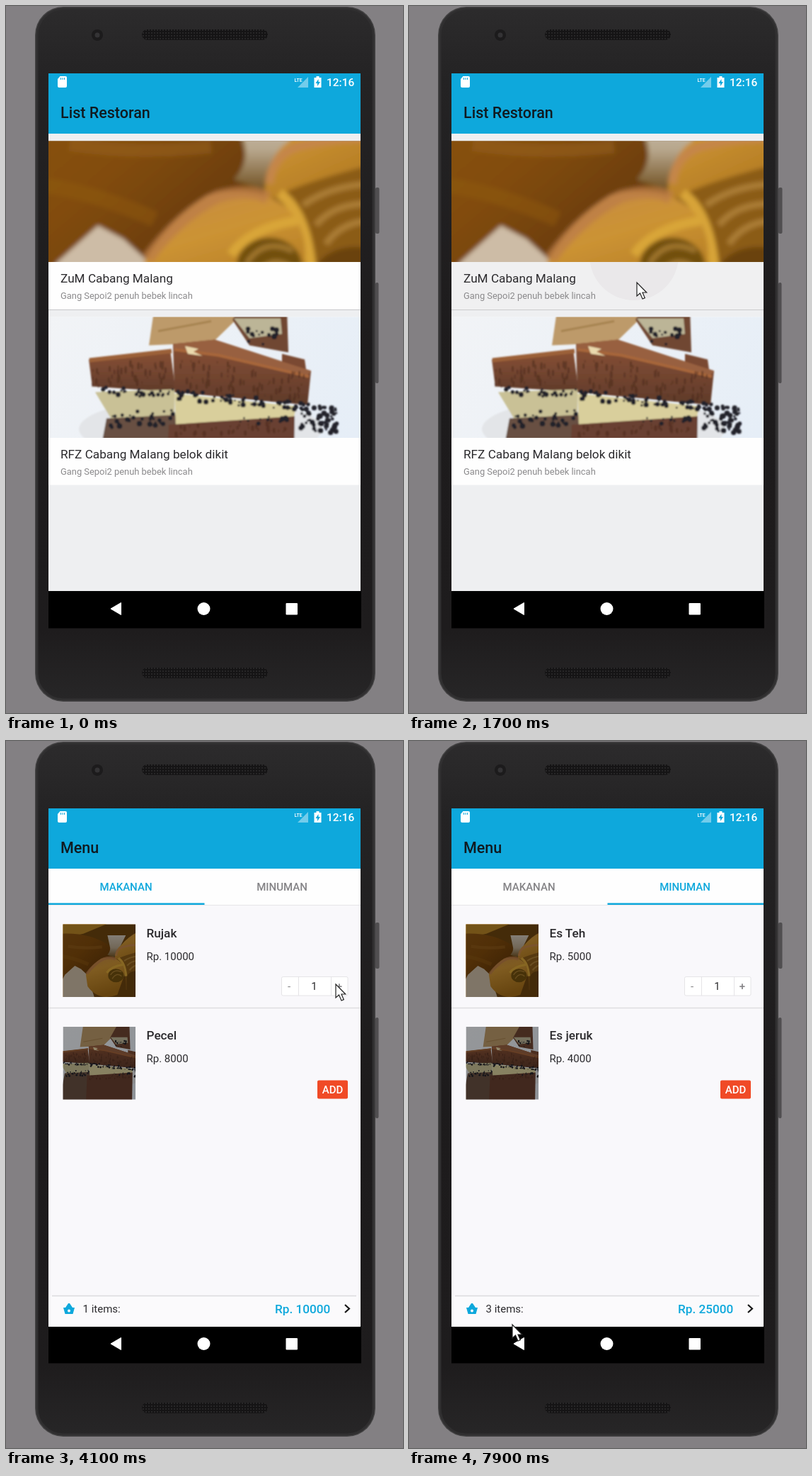
An HTML page that plays this animation: 561 px wide and 997 px high, repeating every 8 s.

```html
<!DOCTYPE html>
<html lang="id">
<head>
<meta charset="utf-8">
<title>List Restoran</title>
<style>
html, body { margin: 0; width: 100%; height: 100%; overflow: hidden; background: #838083; }
#stage { display: block; width: 100%; height: 100%; }
text { font-family: Roboto, "Noto Sans", sans-serif; fill: #2b2a2d; }
.title { font-size: 21.5px; font-weight: 500; fill: #101a20; }
.name { font-size: 17.2px; }
.small { font-size: 12.9px; fill: #8b8a8c; }
.body { font-size: 15px; }
.bold { font-weight: 500; }
.mid { text-anchor: middle; }
.white { fill: #fff; }
.grey { fill: #858487; }
.blue { fill: #0ea8dc; }
</style>
</head>
<body>
<svg id="stage" viewBox="0 0 561 997" preserveAspectRatio="none">
<defs>
  <linearGradient id="case" x2="0" y2="1">
    <stop stop-color="#2c2b2c"/><stop offset=".1" stop-color="#242324"/>
    <stop offset=".5" stop-color="#1d1b1c"/><stop offset=".9" stop-color="#1e1c1d"/><stop offset="1" stop-color="#272627"/>
  </linearGradient>
  <linearGradient id="crust" x2=".8" y2="1">
    <stop stop-color="#8a5413"/><stop offset=".4" stop-color="#824c0c"/><stop offset="1" stop-color="#5a3206"/>
  </linearGradient>
  <linearGradient id="dish" x2="0" y2="1">
    <stop stop-color="#d3cabd"/><stop offset=".55" stop-color="#b7a68c"/><stop offset="1" stop-color="#6e4d1c"/>
  </linearGradient>
  <linearGradient id="gold" x2=".3" y2="1">
    <stop stop-color="#c58a45"/><stop offset=".35" stop-color="#cc9334"/><stop offset="1" stop-color="#a46d18"/>
  </linearGradient>
  <linearGradient id="sky" x2="1" y2=".4">
    <stop stop-color="#f3f4f6"/><stop offset="1" stop-color="#e6eef7"/>
  </linearGradient>
  <linearGradient id="cake" x2="0" y2="1">
    <stop stop-color="#8a5233"/><stop offset=".4" stop-color="#794831"/><stop offset="1" stop-color="#5f3b2b"/>
  </linearGradient>
  <filter id="soft"><feGaussianBlur stdDeviation="3"/></filter>
  <filter id="crisp"><feGaussianBlur stdDeviation="1"/></filter>
  <pattern id="mesh" width="4" height="4" patternUnits="userSpaceOnUse">
    <rect width="4" height="4" fill="#151415"/><circle cx="2" cy="2" r="1" fill="#2c2b2c"/>
  </pattern>
  <g id="rolls">
    <rect x="-30" y="-140" width="520" height="460" fill="#6e450f"/>
    <g filter="url(#soft)">
      <path d="M-20-140H290L120-70-20-40Z" fill="#b98526"/>
      <path d="M-20-70Q160-80 272 0 285 30 262 55 300 70 230 100L160 240H-20Z" fill="url(#crust)"/>
      <path d="M30 5Q130 20 230 8" fill="none" stroke="#9a6420" stroke-width="18" opacity=".5"/>
      <path d="M-20 60Q60 70 150 110" fill="none" stroke="#8f5a15" stroke-width="22" opacity=".5"/>
      <path d="M262-60H370L330 20 312 72 262 54Q285 30 275 0Z" fill="url(#dish)"/>
      <path d="M-20 320V230L12 171 70 119 106 138 142 171 190 320Z" fill="#cdbca6"/>
      <path d="M305 78Q308 20 340 0 400-70 470-90V160Q400 100 330 82Z" fill="url(#gold)"/>
      <path d="M312 60Q316 20 352 8 400-5 460-4" fill="none" stroke="#c58648" stroke-width="12"/>
      <path d="M330 74Q370 55 470 30V260H372Q368 110 330 74Z" fill="#8b5c18"/>
      <path d="M360 90Q400 62 460 60M378 118Q405 86 460 88M392 145Q415 112 460 112" fill="none" stroke="#b98c40" stroke-width="9" opacity=".7"/>
      <path d="M375 180Q400 140 460 152V260H375Z" fill="#6b430e"/>
      <path d="M326 74Q364 100 371 180" fill="none" stroke="#d8a438" stroke-width="15"/>
      <path d="M135 171Q170 110 225 76 285 62 325 85 368 115 362 171L320 290Q210 330 145 240Z" fill="url(#gold)"/>
      <path d="M140 166Q185 105 240 78 285 66 310 80" fill="none" stroke="#bd7d49" stroke-width="17" opacity=".75"/>
      <path d="M258 160Q285 122 352 112" fill="none" stroke="#d9a637" stroke-width="13"/>
      <ellipse cx="312" cy="176" rx="46" ry="40" fill="#72500f"/>
      <path d="M280 172Q305 135 345 155M290 195Q315 155 345 180" fill="none" stroke="#b4873a" stroke-width="6" opacity=".8"/>
    </g>
  </g>
  <g id="cakes">
    <rect x="-30" y="-60" width="520" height="330" fill="url(#sky)"/>
    <g filter="url(#crisp)">
      <ellipse cx="215" cy="158" rx="172" ry="44" fill="#e3e5e8"/>
      <path d="M142 40L155-50H290L265 4 232 36Z" fill="#bd9a6b"/>
      <path d="M155 20L230 6" stroke="#a6834f" stroke-width="3"/>
      <path d="M260 4L285-40H336L339 50 284 40Z" fill="#6f4632"/>
      <path d="M262 2H328L330 24 284 30Z" fill="#bcb597"/>
      <path d="M330 52L362 60 364 74 330 66Z" fill="#7a4a32"/>
      <path d="M57 60L172 46 180 106 62 98Z" fill="url(#cake)"/>
      <path d="M58 61L174 48" stroke="#9b6038" stroke-width="6"/>
      <path d="M66 106L178 102V140L90 146Z" fill="#c9c196"/>
      <path d="M82 143L182 138V260H60Z" fill="#685042"/>
      <path d="M176 38L235 32 371 76 366 124 300 118 178 106Z" fill="url(#cake)"/>
      <path d="M176 38L235 32 371 76 365 84 240 54 178 46Z" fill="#986040"/>
      <path d="M178 46L240 54 368 84" fill="none" stroke="#a7663a" stroke-width="4"/>
      <path d="M178 108L350 126 346 146 180 154Z" fill="#d9cf9c"/>
      <path d="M170 152L348 140 346 260H165Z" fill="#694030"/>
      <path d="M193 41L212 45 205 49 218 55 197 52Z" fill="#ead9ad"/>
      <g id="pores" fill="#4b2a1d" opacity=".55"></g>
      <g id="crumbs" fill="#22222a"></g>
    </g>
  </g>
</defs>

<rect width="561" height="997" fill="#838083"/>
<rect x="522" y="256" width="5.500" height="65" rx="2" fill="#504e50"/>
<rect x="522" y="390" width="4.500" height="142" rx="2" fill="#504e50"/>
<rect x="41" y="1" width="481" height="980" rx="40" fill="#434243"/>
<rect x="44" y="4" width="475" height="974" rx="37" fill="url(#case)" stroke="#302f30" stroke-width="3"/>
<rect x="192" y="33" width="178" height="15" rx="7.5" fill="url(#mesh)"/>
<rect x="192" y="933" width="178" height="15" rx="7.5" fill="url(#mesh)"/>
<circle cx="129" cy="41" r="8" fill="#1c1b1c"/><circle cx="129" cy="41" r="3.5" fill="#343335"/>

<rect x="60" y="825" width="442" height="52.5"/>
<svg x="60" y="95" width="441" height="731" viewBox="60 95 441 731">
  <rect x="60" y="95" width="441" height="730" fill="#eeeff1"/>
  <g id="cards"></g>
  <rect x="60" y="95" width="441" height="85" fill="#0ea8dc"/>
  <text class="title" x="77" y="158">List Restoran</text>

  <g id="menu">
    <rect x="60" y="95" width="441" height="731" fill="#f9f8fb"/>
    <rect x="60" y="95" width="441" height="85" fill="#0ea8dc"/>
    <text class="title" x="77" y="158">Menu</text>
    <rect x="60" y="180" width="441" height="51" fill="#fefefe"/>
    <path d="M60 231.5H501" stroke="#e6e5e8"/>
    <text class="body bold mid" x="169.5" y="211" id="tab0">MAKANAN</text>
    <text class="body bold mid" x="390" y="211" id="tab1">MINUMAN</text>
    <rect id="line" x="60" y="228.5" width="220.5" height="2.5" fill="#0ea8dc"/>
    <g id="pages"></g>
    <g id="cart">
      <rect x="60" y="782" width="441" height="44" fill="#fbfafc"/>
      <path d="M65 782.5H495" stroke="#dbdadd" stroke-width="1.5"/>
      <path d="M81 799H97L94.5 808H83.5ZM84 799L88 793H90L94 799" fill="#0ea8dc"/>
      <circle cx="89" cy="803.5" r="2" fill="#fbfafc"/>
      <text class="body" x="108.5" y="806" id="count"></text>
      <text class="name bold blue" x="380" y="807" id="total"></text>
      <path d="M479 795L485 800.5 479 806" fill="none" stroke="#161616" stroke-width="2.2"/>
    </g>
  </g>
</svg>

<path d="M76.500 99H84Q86 99 86 101V113Q86 115 84 115H75Q73 115 73 113V103Z" fill="#fff"/>
<path d="M77.500 101V104M80 101V104M82.500 101V104" stroke="#0ea8dc"/>
<path d="M427 100V115H412Z" fill="#fff" opacity=".42"/>
<text class="white bold" x="407.500" y="106.500" font-size="7">LTE</text>
<path d="M438.500 99H442.500V101H445.500V115H435.500V101H438.500Z" fill="#fff"/>
<path d="M441.500 103L437.500 109H440V113L444 107H441.500Z" fill="#0ea8dc"/>
<text class="white bold" x="453" y="113" font-size="15.500">12:16</text>
<g fill="#fff">
  <path d="M148 850L162.500 841.500V858.500Z" stroke="#fff" stroke-linejoin="round"/>
  <circle cx="279.500" cy="850" r="9"/>
  <rect x="395.500" y="842" width="16.500" height="16.500" rx="1"/>
</g>
<path id="cursor" d="M0 0V19L4.500 15 8 23 11.300 21.600 8 14H13.800Z" fill="#fff" stroke="#222" stroke-width="1.200"/>
</svg>

<script>
const $ = id => document.getElementById(id);
const set = (id, attrs) => { for (const k in attrs) $(id).setAttribute(k, attrs[k]); };
const show = (id, on) => set(id, { display: on ? 'inline' : 'none' });

// Seeded specks inside a box that may lean by `slope`
let seed = 7;
const rand = () => (seed = seed * 16807 % 2147483647) / 2147483647;
const scatter = (n, x, y, w, h, slope, size = 2.6, tall = 1) => Array.from({ length: n }, () => {
  const u = rand(), v = rand(), r = size * (.5 + rand());
  return `<ellipse cx="${x + u * w}" cy="${y + v * h + u * slope}" rx="${r}" ry="${r * tall}"/>`;
}).join('');
$('pores').innerHTML = scatter(45, 62, 68, 110, 30, -5, 1.3, 3) + scatter(75, 182, 56, 180, 42, 25, 1.3, 3) +
  scatter(40, 180, 154, 160, 14, -6, 1.5, 2);
$('crumbs').innerHTML = scatter(30, 64, 98, 112, 12, 4) + scatter(30, 86, 134, 92, 22, -4) +
  scatter(60, 182, 102, 170, 14, 18) + scatter(14, 270, 142, 78, 10, -4) +
  scatter(75, 356, 120, 52, 38, 8) + scatter(16, 275, 10, 55, 26, 5);

const card = (y, art, name) => `
  <rect x="60" y="${y}" width="441" height="237" fill="#fefefe"/>
  ${y < 200 ? `<path d="M60 428.500H501" stroke="#cbcbcd"/>
    <g id="press"><rect x="60" y="361" width="441" height="67" fill="#f0f0f1"/>
    <svg x="60" y="361" width="441" height="67" viewBox="60 361 441 67">
    <circle id="ripple" fill="#eae8ea"/></svg></g>` : ''}
  <svg x="60" y="${y}" width="441" height="170.5"><use href="#${art}"/></svg>
  <text class="name" x="77" y="${y + 199.5}">${name}</text>
  <text class="small" x="77" y="${y + 222.5}">Gang Sepoi2 penuh bebek lincah</text>`;
$('cards').innerHTML = card(190.5, 'rolls', 'ZuM Cabang Malang') +
  card(438.5, 'cakes', 'RFZ Cabang Malang belok dikit');

const crop = { rolls: 'translate(0 30) scale(.24)', cakes: 'translate(-27 14) scale(.36)' };
const item = (id, x, y, art, name, price) => `<g transform="translate(${x} ${y})">
  <svg x="80.5" y="258.500" width="102.500" height="102.500">
    <use href="#${art}" transform="${crop[art]}"/><rect width="103" height="103" opacity=".38"/></svg>
  <text class="name bold" x="198.500" y="276.500">${name}</text>
  <text class="body" x="198.500" y="308.500">Rp. ${price}</text>
  <path d="M60 376.500H501" stroke="#dedde0" stroke-width="1.300" ${y ? 'display="none"' : ''}/>
  <g id="add${id}"><rect x="440" y="334" width="43" height="26" rx="2" fill="#f04a26"/>
    <text class="body bold white mid" x="461.500" y="352.500">ADD</text></g>
  <g id="step${id}" display="none">
    <rect x="389.500" y="332.500" width="93.500" height="26.500" rx="2" fill="#fff" stroke="#e5e4e7"/>
    <path d="M413.500 332V359M459.500 332V359" stroke="#e5e4e7"/>
    <text class="body mid grey" x="400" y="351">-</text>
    <text class="body mid" x="435.500" y="351" id="qty${id}">1</text>
    <text class="body mid bold grey" x="471" y="351">+</text></g></g>`;
$('pages').innerHTML =
  item('A', 0, 0, 'rolls', 'Rujak', 10000) + item('B', 0, 144.5, 'cakes', 'Pecel', 8000) +
  item('C', 441, 0, 'rolls', 'Es Teh', 5000) + item('D', 441, 144.5, 'cakes', 'Es jeruk', 4000) +
  '<circle id="tap" cx="470" cy="351" r="10" opacity=".15"/>';

// Linear interpolation over [time, ...values] keys
const track = (t, keys) => {
  const i = keys.findIndex(k => k[0] > t);
  if (i < 0) return keys[keys.length - 1].slice(1);
  if (!i) return keys[0].slice(1);
  const a = keys[i - 1], b = keys[i], u = (t - a[0]) / (b[0] - a[0]);
  return a.slice(1).map((v, j) => v + (b[j + 1] - v) * u);
};

const pointer = [
  [100, 430, 60], [600, 385, 110], [1000, 341, 146], [1200, 336, 210], [1500, 323, 385],
  [1700, 322, 390], [1900, 319, 401], [2100, 345, 400], [2600, 466, 343], [4700, 466, 343],
  [5000, 400, 535], [5100, 380, 550], [5400, 75, 550], [5500, 67, 549], [5700, 150, 510],
  [6200, 466, 343], [7000, 460, 335], [7200, 330, 200], [7400, 150, 110], [7600, 60, 300],
  [7800, 120, 638], [7900, 146, 823]
];
const swipe = [[5100, 0], [5400, .75], [5500, .9875], [5600, 1]];
const marker = [[5100, 0], [5400, .7], [5500, .966], [5600, 1]];
const entry = [[1800, 26, .7], [1900, 2, 1], [2000, 0, 1]];
const wave = [[1600, 322, 388, 12], [1700, 318, 352, 63], [1800, 305, 330, 125]];

function draw(t) {
  show('cursor', t >= 100);
  set('cursor', { transform: `translate(${track(t, pointer)})` });

  show('press', t >= 1600 && t < 1900);
  const [cx, cy, r] = track(t, wave);
  set('ripple', { cx, cy, r });

  show('menu', t >= 1800);
  const [drop, alpha] = track(t, entry);
  set('menu', { transform: `translate(0 ${drop})`, opacity: alpha });

  const second = t >= 5300;
  set('tab0', { class: 'body bold mid ' + (second ? 'grey' : 'blue') });
  set('tab1', { class: 'body bold mid ' + (second ? 'blue' : 'grey') });
  set('pages', { transform: `translate(${-441 * track(t, swipe)[0]} 0)` });
  set('line', { x: 60 + 220.5 * track(t, marker)[0] });
  show('tap', t >= 2800 && t < 3000);

  const food = t < 3000 ? 0 : t < 4700 ? 1 : 2, drink = t < 6500 ? 0 : 1;
  show('addA', !food); show('stepA', food);
  show('addC', !drink); show('stepC', drink);
  $('qtyA').textContent = food;
  show('cart', food);
  set('cart', { transform: `translate(0 ${track(t, [[3000, 30], [3200, 0]])[0]})` });
  $('count').textContent = food + drink + ' items:';
  $('total').textContent = 'Rp. ' + (food * 10000 + drink * 5000);
}

// The screen updates ten times a second
const start = performance.now();
let last = -1;
function loop() {
  const t = Math.floor((performance.now() - start) % 8000 / 100) * 100;
  if (t !== last) draw(last = t);
  requestAnimationFrame(loop);
}
loop();
</script>
</body>
</html>
```
